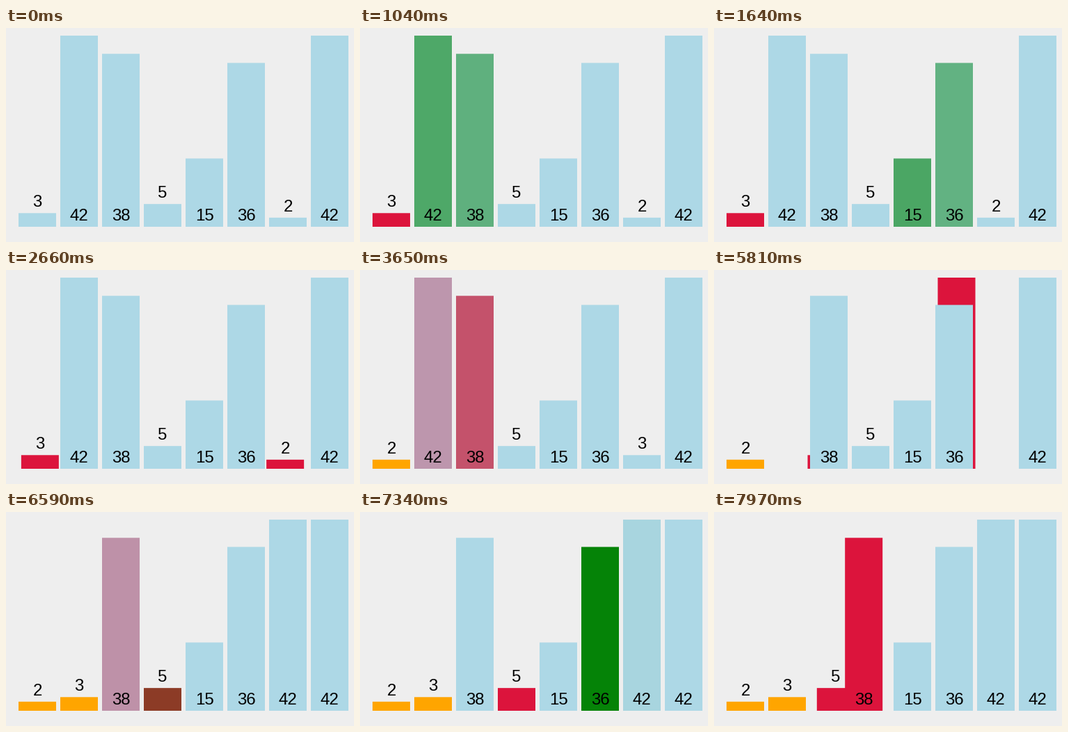
Recreate the animation shown at these times as a matplotlib script. Size 500 by 309 pixels, loop 8 s.

```python
import numpy as np
import matplotlib.pyplot as plt
from matplotlib.animation import FuncAnimation
from matplotlib.patches import Rectangle

W, H, DPI = 500, 309, 100
LOOP, TICK = 8000, 10
FADE = 180                      # length of one transition in ms
LEFT, PITCH, BAR_W, BASE = 18, 60, 54, 287
UNIT = 276 / 42                 # bar height per value
FONT_PX = 24
VALUES = [3, 42, 38, 5, 15, 36, 2, 42]
N = len(VALUES)

BLUE, GREEN = (173, 216, 230), (0, 128, 0)
RED, ORANGE = (220, 20, 60), (255, 165, 0)

# Moments at which successive steps of the sort begin.
STARTS = [440, 710, 953, 1222, 1257, 1554, 1824, 2105, 2370, 2380, 2635, 2900,
          3185, 3490, 3549, 3752, 4025, 4284, 4565, 4828, 4838, 5096,
          5424, 5695, 5963, 6045, 6217, 6491, 6757, 7038, 7305, 7578, 7676, 7852]


def target(order, done, red=(), green=None):
    """Colour and x of every bar once a step has settled."""
    goal = np.zeros((N, 4))
    for slot, bar in enumerate(order):
        if slot in red:
            colour = RED
        elif slot == green:
            colour = GREEN
        else:
            colour = ORANGE if slot < done else BLUE
        goal[bar] = (*colour, LEFT + PITCH * slot)
    return goal


def selection_sort():
    order = list(range(N))
    for i in range(N - 1):
        low = i
        yield target(order, i, (low,))
        for j in range(i + 1, N):
            yield target(order, i, (low,), j)
            if VALUES[order[j]] < VALUES[order[low]]:
                low = j
                yield target(order, i, (low,))
        yield target(order, i, (i, low))
        order[i], order[low] = order[low], order[i]
        yield target(order, i, (i, low))
        yield target(order, i + 1)


def ease(p):
    p = min(max(p, 0), 1)
    return 4 * p**3 if p < 0.5 else 1 - 4 * (1 - p)**3


def blend(step, t):
    start, begin, goal = step
    return begin + (goal - begin) * ease((t - start) / FADE)


# Each step departs from wherever the previous one has got to.
steps = [(0, target(range(N), 0), target(range(N), 0))]
for start, goal in zip(STARTS, selection_sort()):
    steps.append((start, blend(steps[-1], start), goal))


def state_at(t):
    return blend([s for s in steps if s[0] <= t][-1], t)


fig = plt.figure(figsize=(W / DPI, H / DPI), dpi=DPI, facecolor="#eeeeee")
ax = fig.add_axes([0, 0, 1, 1])
ax.set_xlim(0, W)
ax.set_ylim(H, 0)
ax.axis("off")

bars, labels = [], []
for k, value in enumerate(VALUES):
    height = value * UNIT
    top = BASE - height
    bar = Rectangle((0, top), BAR_W, height, linewidth=0, snap=False, zorder=k + 1)
    bars.append(ax.add_patch(bar))
    baseline = BASE - 9 if value >= 10 else round(top - 9)
    labels.append(ax.text(0, baseline, str(value), ha="center", va="baseline",
                          family="Liberation Sans", fontsize=FONT_PX * 72 / DPI,
                          color="black", zorder=k + 1.5))


def draw(frame):
    t = frame * TICK
    t = 0 if t < 500 else 20 + (t - 20) // 30 * 30
    for bar, label, (r, g, b, x) in zip(bars, labels, state_at(t)):
        bar.set_x(x)
        bar.set_facecolor((r / 255, g / 255, b / 255))
        label.set_x(x + BAR_W / 2)
    return bars + labels


anim = FuncAnimation(fig, draw, frames=LOOP // TICK, interval=TICK,
                     repeat=True, repeat_delay=0, blit=False)
plt.show()
```
